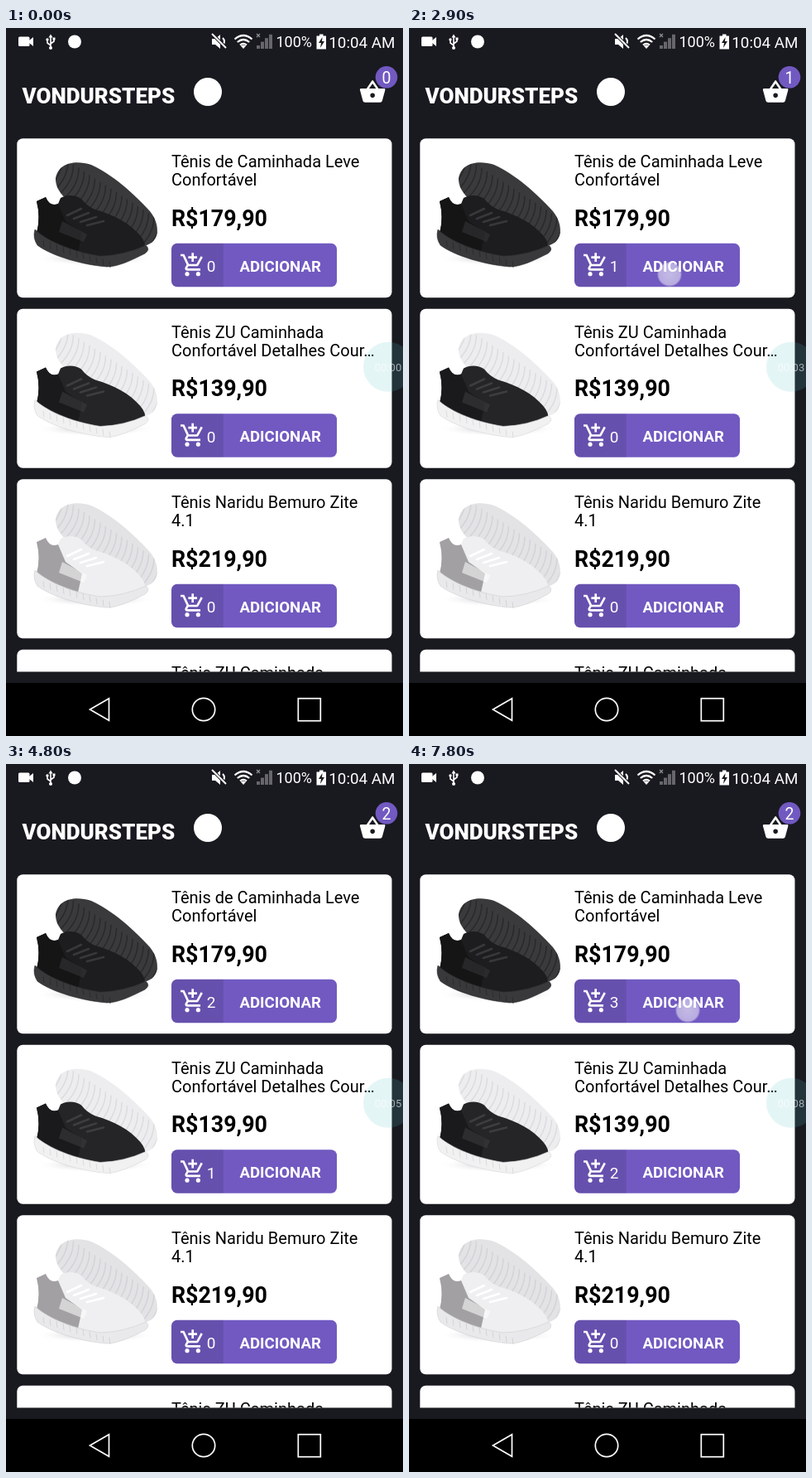
An HTML page that plays this animation: 480x854 px, repeating every 8000 ms.

```html
<!DOCTYPE html>
<html lang="pt-BR">
<head>
<meta charset="utf-8">
<title>Loja de tênis</title>
<style>
  html, body { margin: 0; width: 100%; height: 100%; overflow: hidden; background: #191920; }
  svg { display: block; width: 100vw; height: 100vh; }
  text { font-family: Roboto, "Noto Sans", sans-serif; white-space: pre; }
  .bold { font-weight: 700; }
  .black { font-weight: 900; }
</style>
</head>
<body>
<svg id="stage" viewBox="0 0 480 854"></svg>
<script>
const LOOP = 8000;
const PURPLE = '#7159c1';
const CARD_TOP = 133.2, CARD_PITCH = 205.5;
const stage = document.getElementById('stage');

const products = [
  { title: ['Tênis de Caminhada Leve', 'Confortável'], price: 'R$179,90', counts: [2200, 3600, 7700],
    shoe: { back: '#3a3a3c', tread: '#29292b', upper: '#1d1d1f', heel: '#151516', sole: '#39393b', lace: '#38383a', edge: '#29292b' } },
  { title: ['Tênis ZU Caminhada', 'Confortável Detalhes Cour…'], price: 'R$139,90', counts: [4800, 6300],
    shoe: { back: '#ededef', tread: '#dcdcdf', upper: '#252527', heel: '#1a1a1c', sole: '#f1f1f2', lace: '#3d3d40', edge: '#d6d6d9' } },
  { title: ['Tênis Naridu Bemuro Zite', '4.1'], price: 'R$219,90', counts: [],
    shoe: { back: '#e3e3e6', tread: '#d3d3d7', upper: '#efeff1', heel: '#a3a0a3', sole: '#e9e9eb', lace: '#ffffff', edge: '#cfcfd3' } },
  { title: ['Tênis ZU Caminhada'], price: '', counts: [] },
];

// Finger down at `down`; the ripple starts at `press`.
const taps = [
  { x: 321, y: 288, down: 1260, press: 1280 },
  { x: 315, y: 297, down: 2600, press: 2950 },
  { x: 340, y: 498, down: 3900, press: 4050 },
  { x: 330, y: 485, down: 5360, press: 5400 },
  { x: 326, y: 285, down: 6300, press: 6820 },
  { x: 337, y: 297, down: 7700, press: 8200 },
];
const badgeTimes = [2200, 4800];
const clockTimes = [800, 1800, 2700, 3700, 4700, 5700, 6800, 7700];

const cartPath = 'M11 9h2V6h3V4h-3V1h-2v3H8v2h3v3zm-4 9c-1.1 0-1.99.9-1.99 2S5.9 22 7 22s2-.9 2-2-.9-2-2-2zm10 0c-1.1 0-1.99.9-1.99 2s.89 2 1.99 2 2-.9 2-2-.9-2-2-2zm-9.83-3.25l.03-.12.9-1.63h7.45c.75 0 1.41-.41 1.75-1.03l3.86-7.01L19.42 4h-.01l-1.1 2-2.76 5H8.53L6.16 6l-.95-2-.94-2H1v2h2l3.6 7.59-1.35 2.45c-.16.28-.25.61-.25.96 0 1.1.9 2 2 2h12v-2H7.42c-.13 0-.25-.11-.25-.25z';
const basketPath = 'M17.21 9l-4.38-6.56a1 1 0 0 0-1.66 0L6.79 9H2c-.55 0-1 .45-1 1l.04.27 2.54 9.27c.23.84 1 1.46 1.92 1.46h13c.92 0 1.69-.62 1.93-1.46l2.54-9.27L23 10c0-.55-.45-1-1-1h-4.79zM9 9l3-4.4L15 9H9zm3 8a2 2 0 1 1 0-4 2 2 0 0 1 0 4z';
const backPath = 'M60 182C62 164 82 158 103 165C128 176 155 200 174 221C186 236 187 256 170 262C140 262 111 241 90 222C72 206 60 197 60 182Z';

const text = (x, y, size, content, attrs = '') =>
  `<text x="${x}" y="${y}" font-size="${size}" ${attrs}>${content}</text>`;
const icon = (x, y, path, scale = 1.333) =>
  `<path transform="translate(${x} ${y}) scale(${scale})" fill="#fff" d="${path}"/>`;
const buttonTop = card => CARD_TOP + card * CARD_PITCH + 126.6;

// Drawn in the coordinates of the first card.
function shoe(c) {
  const treads = Array.from({ length: 20 }, (_, i) =>
    `M${62 + i * 6.5} ${152 + i * 4.2}q0 24-24 42`).join('');
  const laces = [0, 1, 2, 3].map(i =>
    `M${74 + i * 8} ${226 + i * 4}l${17 + i} ${-8 + i}`).join('');
  const ridges = Array.from({ length: 11 }, (_, i) =>
    `M${45 + i * 8} ${256 + i * 2.5}l1 8`).join('');
  return `
    <ellipse cx="108" cy="278" rx="72" ry="9" fill="url(#shadow)"/>
    <path d="${backPath}" fill="${c.back}"/>
    <path d="${treads}" clip-path="url(#backSole)" fill="none" stroke="${c.tread}" stroke-width="1.5"/>
    <path d="M37 209L48 204Q53 216 63 212L66 205C73 201 84 201 91 206Q98 215 108 219C130 225 150 236 162 250Q170 259 168 268L121 281C90 276 55 264 37 248Q42 228 37 209Z" fill="${c.upper}"/>
    <path d="M37 209L48 204Q53 216 63 212L72 233L92 247L87 270Q55 262 37 247Q42 228 37 209Z" fill="${c.heel}"/>
    <path d="M68 233L98 249L94 258L64 246Z" fill="${c.lace}" opacity=".55"/>
    <path d="${laces}" stroke="${c.lace}" stroke-width="2.6" stroke-linecap="round"/>
    <path d="M35 243C46 254 75 269 114 275Q143 274 169 262Q175 267 168 272C150 281 135 288 122 288C94 286 55 275 38 262Q32 253 35 243Z" fill="${c.sole}" stroke="${c.edge}" stroke-width=".6"/>
    <path d="${ridges}" stroke="${c.edge}" stroke-width=".8"/>`;
}

function card(product, i) {
  const button = product.price && `
    ${shoe(product.shoe)}
    ${text(200, 238.7, 26.8, product.price, 'class="bold"')}
    <rect x="200" y="259.8" width="200" height="52.5" rx="7" fill="${PURPLE}"/>
    <path d="M262.7 259.8V312.3H207a7 7 0 0 1-7-7V266.8a7 7 0 0 1 7-7Z" fill="#000" opacity=".1"/>
    ${icon(209.7, 270, cartPath)}
    ${text(242.7, 294, 19, '0', `id="count${i}" fill="#fff"`)}
    ${text(282.4, 293.6, 18.67, 'ADICIONAR', 'class="bold" fill="#fff"')}`;
  return `<g transform="translate(0 ${i * CARD_PITCH})">
    <rect x="13.3" y="${CARD_TOP}" width="453.2" height="192" rx="7" fill="#fff"/>
    ${product.title.map((line, n) => text(200, 168 + n * 22, 20, line)).join('')}
    ${button}</g>`;
}

function statusBar() {
  const bars = [0, 1, 2, 3].map(i =>
    `<rect x="${303 + i * 5}" y="${21 - i * 4.4}" width="4" height="${4 + i * 4.4}" fill="#66666c"/>`).join('');
  return `<g fill="#fff">
    <rect x="15" y="10.5" width="13.5" height="11.5" rx="1.5"/><path d="M28 15l5-4v11l-5-4z"/>
    <path d="M54 10v14M54 21l-4-3v-4M54 19l4-3v-3" fill="none" stroke="#fff" stroke-width="1.6"/>
    <path d="M51.5 11.5l2.5-4 2.5 4z"/><circle cx="54" cy="24" r="2"/><circle cx="50" cy="14" r="1.7"/><path d="M56.5 11.5h3v3h-3z"/>
    <circle cx="83" cy="16.5" r="8"/>
    <path d="M249 13h4l6-5v17l-6-5h-4z"/><path d="M262 12q4 4 0 9" fill="none" stroke="#fff" stroke-width="2"/>
    <path d="M249 7l17 17" stroke="#191920" stroke-width="4"/><path d="M249 7l17 17" stroke="#fff" stroke-width="2"/>
    <g fill="none" stroke="#fff" stroke-width="2.2"><path d="M276.5 13.5q10.5-9 21 0M279.8 17q7.2-6 14.4 0M283 20.5q4-3.4 8 0"/></g>
    <path d="M283.8 21.5q3.2-2 6.4 0l-3.2 3.5z"/>
    ${bars}<path d="M303 7l4 4m0-4l-4 4" stroke="#909096" stroke-width="1.2"/>
    ${text(326.5, 23.4, 18, '100%')}
    <path d="M375.5 9.5h3.5v-2h4.5v2h3.5v16h-11.5z"/><path d="M382.5 11l-4.5 7h3l-1 6 5-8h-3z" fill="#191920"/>
    ${text(390.3, 23.8, 18.8, '10:04 AM')}</g>`;
}

stage.innerHTML = `
  <defs>
    <clipPath id="list"><rect y="120" width="480" height="656.5"/></clipPath>
    <clipPath id="backSole"><path d="${backPath}"/></clipPath>
    <clipPath id="buttons">${[0, 1].map(i =>
      `<rect x="200" y="${buttonTop(i)}" width="200" height="52.5" rx="7"/>`).join('')}</clipPath>
    <radialGradient id="shadow"><stop offset=".4" stop-color="#e2e2e5"/><stop offset="1" stop-color="#fff" stop-opacity="0"/></radialGradient>
    <radialGradient id="spotFill">
      <stop offset="0" stop-color="#fff" stop-opacity=".58"/><stop offset=".86" stop-color="#fff" stop-opacity=".5"/>
      <stop offset="1" stop-color="#fff" stop-opacity=".08"/>
    </radialGradient>
  </defs>
  <rect width="480" height="854" fill="#191920"/>
  ${statusBar()}
  ${text(19.5, 91.3, 26, 'VONDURSTEPS', 'class="black" fill="#fff"')}
  <circle cx="244" cy="77" r="17" fill="#fff"/>
  ${icon(426.5, 60.5, basketPath, 1.39)}
  <circle cx="460" cy="59.3" r="13.3" fill="${PURPLE}"/>
  ${text(460, 66.5, 19.5, '0', 'id="badge" fill="#fff" text-anchor="middle"')}
  <g clip-path="url(#list)">${products.map(card).join('')}</g>
  <g clip-path="url(#buttons)"><circle id="ripple"/></g>
  <circle id="spot" r="15" fill="url(#spotFill)"/>
  <circle cx="462" cy="408.7" r="30" fill="#5abec8" opacity=".16"/>
  ${text(462, 413.5, 13, '00:00', 'id="clock" fill="#fff" fill-opacity=".6" text-anchor="middle"')}
  <rect y="790" width="480" height="64" fill="#000"/>
  <g fill="none" stroke="#fff" stroke-width="1.7">
    <path d="M101.5 822L124.5 808.7V835.3Z"/><circle cx="239" cy="822" r="13.7"/><rect x="353.3" y="808.7" width="27" height="27"/>
  </g>`;

const find = id => document.getElementById(id);
const [badge, clock, ripple, spot] = ['badge', 'clock', 'ripple', 'spot'].map(find);
const counters = products.slice(0, 3).map((_, i) => find('count' + i));
const passed = (times, t) => times.filter(at => t >= at).length;
const clamp = v => Math.max(0, Math.min(1, v));

function setAttrs(node, attrs) {
  for (const key in attrs) node.setAttribute(key, attrs[key]);
}

function render(t) {
  counters.forEach((node, i) => { node.textContent = passed(products[i].counts, t); });
  badge.textContent = passed(badgeTimes, t);
  clock.textContent = '00:0' + passed(clockTimes, t);

  const tap = taps.filter(item => t >= item.down).pop() || { x: 0, y: 0, down: Infinity, press: Infinity };
  const age = t - tap.press;
  const pressed = age >= 0;
  setAttrs(spot, {
    cx: tap.x, cy: tap.y,
    opacity: t >= tap.down ? clamp((t - tap.down + 40) / 60) * clamp(1 - (age - 30) / 220) : 0,
  });
  setAttrs(ripple, {
    cx: tap.x, cy: tap.y,
    r: pressed ? 20 + age * .28 : 0,
    opacity: pressed ? .13 * clamp(1 - age / 400) : 0,
  });
}

function tick(now) {
  render(now % LOOP);
  requestAnimationFrame(tick);
}
render(0);
requestAnimationFrame(tick);
</script>
</body>
</html>
```
